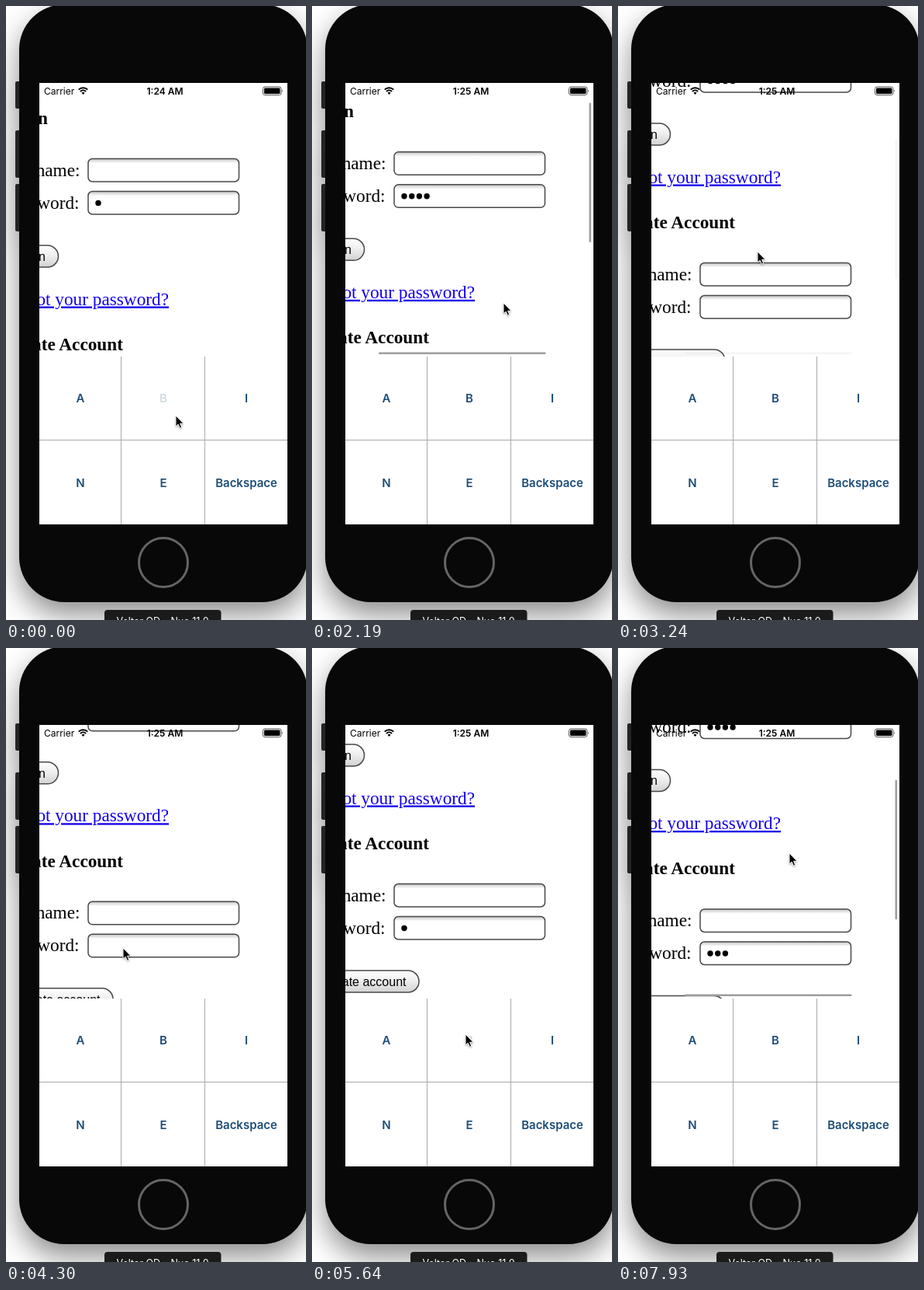
An HTML page that plays this animation: 387x790 px, repeating every 8 s.

```html
<!DOCTYPE html>
<html lang="en">
<head>
<meta charset="utf-8">
<title>Sign-in form with custom keyboard</title>
<style>
html, body { margin: 0; width: 100%; height: 100%; overflow: hidden; background: #fff; }
svg { display: block; }
.ui { font-family: Inter, sans-serif; }
.page { font: 23.27px "Liberation Serif", serif; text-anchor: end; }
.page .btn { font: 16px "Liberation Sans", sans-serif; }
.bold { font-weight: bold; }
.link { fill: #1400ee; text-decoration: underline 1.2px; text-underline-offset: 1.5px; }
.keys { font-size: 15px; font-weight: 600; fill: #1c4d78; text-anchor: middle; }
.body { filter: drop-shadow(0 16px 18px rgba(0, 0, 0, .45)); }
.cursor { filter: drop-shadow(0 1px 1px rgba(0, 0, 0, .35)); }
</style>
</head>
<body>
<svg width="387" height="790" viewBox="0 0 387 790">
  <defs>
    <linearGradient id="inset" x2="0" y2="1">
      <stop stop-color="#c4c4c4"/><stop offset=".2" stop-color="#fff"/>
    </linearGradient>
    <linearGradient id="button" x2="0" y2="1">
      <stop stop-color="#fff"/><stop offset=".45" stop-color="#efefef"/><stop offset="1" stop-color="#d2d2d2"/>
    </linearGradient>
    <clipPath id="view"><rect x="43" y="99" width="320" height="352"/></clipPath>
  </defs>

  <g class="body">
    <path d="M12 99q0-2 2-2h5v35h-5q-2 0-2-2zM12 162q0-2 2-2h5v61h-5q-2 0-2-2zM12 231q0-2 2-2h5v61h-5q-2 0-2-2z" fill="#242424"/>
    <rect x="17" y="-2" width="372" height="769" rx="58" fill="#080808"/>
  </g>
  <circle cx="203" cy="716" r="31.5" fill="none" stroke="#656565" stroke-width="3"/>
  <rect x="127" y="777" width="150.5" height="30" rx="4" fill="#1b1b1b"/>
  <text class="ui" x="202" y="796" font-size="12.5" fill="#fff" text-anchor="middle">Veltor QD – Nuo 11.0</text>
  <rect x="43" y="99" width="320" height="568" fill="#fff"/>

  <g clip-path="url(#view)">
    <g id="page" class="page"></g>
    <g id="bars" fill="#9d9d9d">
      <rect id="bar" x="357.5" width="2.5" height="179.5" rx="1.25"/>
      <rect x="86" y="445.5" width="215.5" height="2.5" rx="1.25"/>
    </g>
  </g>

  <g class="ui" font-size="12">
    <text x="49" y="113.5">Carrier</text>
    <text id="clock" x="205" y="113.5" font-weight="600" text-anchor="middle"></text>
    <g fill="none" stroke="#000" stroke-width="1.9">
      <path d="M93.7 107.6a8.3 8.3 0 0 1 11.6 0M95.9 110a5.2 5.2 0 0 1 7.2 0"/>
      <path d="M99.5 114l-2-2.2a2.9 2.9 0 0 1 4 0z" fill="#000" stroke="none"/>
      <rect x="331.5" y="104" width="23.5" height="10.5" rx="2.5" stroke="#555" stroke-width="1"/>
    </g>
    <rect x="333" y="105.5" width="20.5" height="7.5" rx="1.2"/>
    <path d="M356 107.5q1.8 1.8 0 3.6z" fill="#555"/>
  </g>

  <path d="M148.5 451v216M256.5 451v216M43 558.5h320" stroke="#aaa"/>
  <g id="keys" class="ui keys"></g>
  <path id="cursor" class="cursor" d="M0 0V14L3.2 11.2 5.4 16.2 7.7 15.2 5.6 10.3H10Z" stroke="#fff"/>
</svg>
<script>
const LOOP = 8000, STEP = 87.8;
const $ = id => document.getElementById(id);

// Web page, in coordinates of the unscrolled view
const label = (text, x, y, extra = '') => `<text x="${x}" y="${y}" ${extra}>${text}</text>`;
const field = y => `<rect x="106" y="${y}" width="194.5" height="29.5" rx="5.5"
  fill="url(#inset)" stroke="#484848" stroke-width="1.5"/>`;
const button = (text, right, y) => `<rect x="-60" y="${y}" width="${right + 60}" height="28" rx="14"
  fill="url(#button)" stroke="#484848" stroke-width="1.5"/>` + label(text, right - 16.5, y + 20, 'class="btn"');
const form = (title, right, y, action, buttonRight) =>
  label(title, right, y - 44.5, 'class="bold"') +
  label('Username:', 95.5, y + 22) + field(y) +
  label('Password:', 94.5, y + 64) + field(y + 42) +
  `<g class="dots"></g>` + button(action, buttonRight, y + 111.5);

const formY = [196.5, 487.5];
$('page').innerHTML =
  form('Login', 54, formY[0], 'Login', 67.5) +
  label('Forgot your password?', 210, 384.5, 'class="link"') +
  form('Create Account', 151, formY[1], 'Create account', 138);

const names = ['A', 'B', 'I', 'N', 'E', 'Backspace'];
$('keys').innerHTML = names.map((name, i) =>
  label(name, 96 + i % 3 * 107, i < 3 ? 510 : 618.5)).join('');

// Time is counted in screen updates. Key presses: letter, time, form
const taps = [['A', -5, 0], ['B', -1, 0], ['N', 11, 0], ['E', 16, 0],
  ['A', 59, 1], ['B', 64, 1], ['N', 82, 1]];

// Pointer moves: start, end, x, y
const moves = [
  [0, 0, 219, 528], [1, 9, 112, 589], [12, 15, 204, 598], [17, 20, 233, 422],
  [20, 25, 247, 383], [25, 30, 229, 288], [30, 37, 180, 317], [37, 42, 137, 385],
  [46, 48, 151, 387], [50, 56, 125, 475], [57, 59, 103, 495], [61, 64, 198, 498],
  [67, 75, 105, 593], [83, 87, 223, 234], [87, 90, 221, 265]];

function ease(k, from, to) {
  const u = Math.min(1, Math.max(0, (k - from) / (to - from || 1)));
  return u * u * (3 - 2 * u);
}

const pointer = k => moves.reduce(([x, y], [from, to, nx, ny]) => {
  const f = from === to ? 1 : ease(k, from, to);
  return [x + (nx - x) * f, y + (ny - y) * f];
}, [0, 0]);

// Swipe down the page, jump to the focused field, drag back
const scrollAt = k => 157 * ease(k, 23.5, 34) + 27 * ease(k, 48, 52) - 38.5 * ease(k, 87, 91);
const barsAt = k => ease(k, 23, 24) - ease(k, 35, 37.5) + ease(k, 87, 88);

const dots = (n, y) => Array.from({ length: n }, (_, i) =>
  `<circle cx="${119 + i * 9.7}" cy="${y}" r="3.7"/>`).join('');

function draw(t) {
  const k = Math.floor((t + 25) / STEP);
  const [x, y] = pointer(k), scroll = scrollAt(k);
  $('cursor').setAttribute('transform', `translate(${x} ${y - 1})`);
  $('page').setAttribute('transform', `translate(0 ${-scroll})`);
  $('bar').setAttribute('y', 121.8 + scroll * .317);
  $('bars').setAttribute('opacity', barsAt(k));
  $('clock').textContent = k < 14 ? '1:24 AM' : '1:25 AM';

  document.querySelectorAll('.dots').forEach((g, i) => {
    const count = taps.filter(([, at, form]) => form === i && k >= at + 2).length;
    g.innerHTML = dots(count, formY[i] + 57);
  });
  [...$('keys').children].forEach((key, i) => {
    const tap = taps.find(([name, at]) => name === names[i] && k >= at && k < at + 4);
    key.setAttribute('opacity', tap ? .2 + .8 * ease(k - tap[1], 1, 4) : 1);
  });
}

function tick() {
  draw(performance.now() % LOOP);
  requestAnimationFrame(tick);
}
tick();
</script>
</body>
</html>
```
